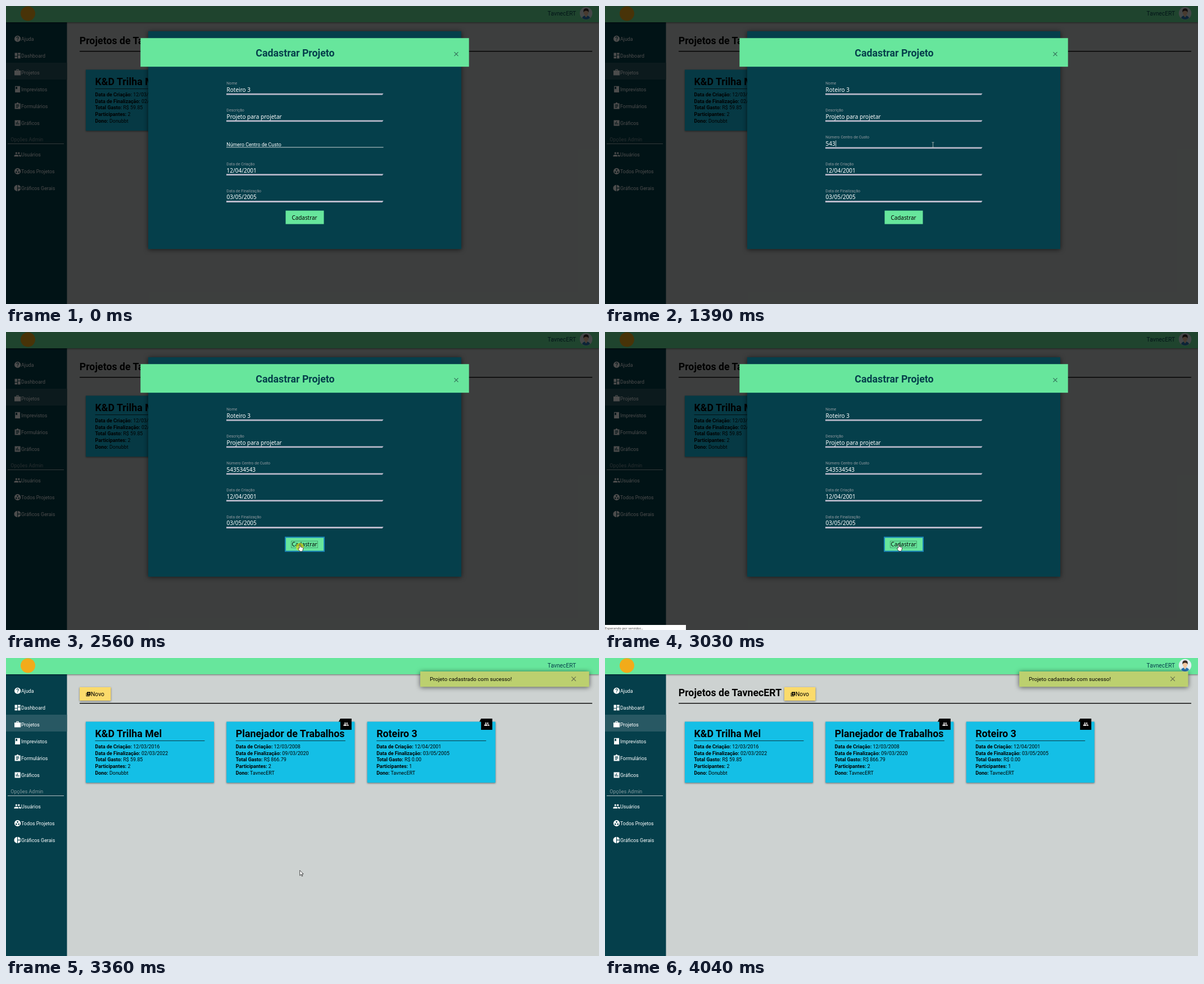
An HTML page that plays this animation: 1055 px wide and 531 px high, repeating every 4.44 s.

```html
<!DOCTYPE html>
<html lang="pt">
<head>
<meta charset="utf-8">
<style>
html, body { margin: 0; width: 100%; height: 100%; overflow: hidden; background: #cdd2d1; }
svg { display: block; width: 1055px; height: 531px; font-family: Roboto, sans-serif; }
.input { font-family: "Noto Sans", sans-serif; font-weight: 500; }
.bold { font-weight: 700; }
.raised { filter: drop-shadow(0 1px 1.5px rgba(0, 0, 0, .5)); }
.modal { filter: drop-shadow(0 1px 4px rgba(0, 0, 0, .6)); }
</style>
</head>
<body>
<svg id="stage" viewBox="0 0 1055 531"></svg>
<script>
const LOOP = 4440, FIRST = 54, STEP = 77.9;
const GREEN = '#67e69c', TEAL = '#053f4b', PITCH = 47.85;
const USER = 'TavnecERT', PROJECT = 'Roteiro 3';

const clamp = (v, lo = 0, hi = 1) => Math.min(hi, Math.max(lo, v));
const mix = (a, b, p) => a + (b - a) * p;
const rect = (x, y, w, h, fill, cls = '') =>
  `<rect x="${x}" y="${y}" width="${w}" height="${h}" fill="${fill}" class="${cls}"/>`;
const text = (x, y, size, str, fill = '#000', cls = '') =>
  `<text x="${x}" y="${y}" font-size="${size}" fill="${fill}" class="${cls}">${str}</text>`;
const circle = (x, y, r, fill, extra = '') =>
  `<circle cx="${x}" cy="${y}" r="${r}" fill="${fill}" ${extra}/>`;
const stroke = (d, color, width = 1) =>
  `<path d="${d}" fill="none" stroke="${color}" stroke-width="${width}"/>`;
const cross = (x, y, r, color) =>
  stroke(`M${x - r} ${y - r}l${2 * r} ${2 * r}m0 ${-2 * r}l${-2 * r} ${2 * r}`, color, 1.2);
const ring = (x, y, r) =>
  `M${x - r} ${y}a${r} ${r} 0 1 0 ${2 * r} 0a${r} ${r} 0 1 0 ${-2 * r} 0`;

// Icons on a 24-unit grid
const ICONS = {
  help: ring(12, 12, 10) + 'M11 17v2h2v-2zM8 9h2a2 2 0 1 1 3.4 1.4q-2.4 2-2.4 4.6h2q0-1.6 2-3.6a4 4 0 1 0-7-2.4z',
  dashboard: 'M3 3h8v10H3zM3 15h8v6H3zM13 11h8v10h-8zM13 3h8v6h-8z',
  work: 'M2 6h6V2h8v4h6v15H2zM10 4v2h4V4z',
  book: 'M4 2h16v20H4zM6 4v8l2.5-1.5L11 12V4z',
  form: 'M3 3h6a3 3 0 0 1 6 0h6v18H3zM7 7v2h10V7zM7 11v2h10v-2zM7 15v2h7v-2z',
  chart: 'M3 3h18v18H3zM7 10v7h2v-7zM11 7v10h2V7zM15 13v4h2v-4z',
  group: ring(8, 8, 3) + ring(16, 8, 3) +
    'M1 19v-2.5c0-4.6 14-4.6 14 0V19zM17 19v-2.5q0-2-2-3.45c3-.3 8 1 8 3.45V19z',
  teams: ring(12, 12, 10) + ring(8, 15, 2.5) + ring(12, 8, 2.5) + ring(16, 15, 2.5),
  pie: 'M11 2v20a10 10 0 0 1 0-20zM13 2v9h9a10 10 0 0 0-9-9zM13 13v9a10 10 0 0 0 9-9z',
  add: 'M2 6h2v14h14v2H2zM6 2h16v16H6zM13 5v4H9v2h4v4h2v-4h4V9h-4V5z'
};
const icon = (name, x, y, size, fill) =>
  `<path transform="translate(${x} ${y}) scale(${size / 24})" d="${ICONS[name]}" fill="${fill}" fill-rule="evenodd"/>`;

const MENU = [
  ['help', 'Ajuda', 59], ['dashboard', 'Dashboard', 89], ['work', 'Projetos', 119],
  ['book', 'Imprevistos', 149], ['form', 'Formulários', 179], ['chart', 'Gráficos', 209],
  ['group', 'Usuários', 265], ['teams', 'Todos Projetos', 295], ['pie', 'Gráficos Gerais', 325]
];
const CARDS = [
  [142, 'K&amp;D Trilha Mel', '12/03/2016', '02/03/2022', '59.85', 2, 'Donubbt'],
  [392.3, 'Planejador de Trabalhos', '12/03/2008', '09/03/2020', '866.79', 2, USER],
  [642.7, PROJECT, '12/04/2001', '03/05/2005', '0.00', 1, USER]
];

function sidebar(loaded) {
  let out = rect(0, 29, 108.5, 502, TEAL);
  if (loaded) {
    out += rect(0, 101, 108.5, 30, '#285863') + text(8.3, 240.6, 8.9, 'Opções Admin', '#84979c') +
      rect(3, 245, 100, 1, '#b4bfc2');
  }
  for (const [name, label, y] of MENU.slice(0, loaded ? 9 : 6))
    out += icon(name, 13.9, y - 7.3, 13.4, '#fff') + text(27, y + 3.4, 8.9, label, '#fff');
  return out;
}

function card([x, title, start, end, cost, people, owner], i) {
  const rows = [['Data de Criação', start], ['Data de Finalização', end],
    ['Total Gasto', 'R$ ' + cost], ['Participantes', people], ['Dono', owner]];
  let out = rect(x, 113.5, 228, 108.7, '#14bfe6', 'raised') +
    text(x + 16.5, 141, 17.8, title, '#000', 'bold') + rect(x + 16.5, 147, 195, 1, '#0b3c48');
  rows.forEach(([key, value], r) => {
    out += text(x + 16.5, 160.8 + r * 11.72, 8.9, `<tspan class="bold">${key}:</tspan> ${value}`);
  });
  if (i) {
    out += `<path d="M${x + 199.5} 113.5l3-5.5h20v20h-20v-14.5z"/>` +
      icon('group', x + 207.7, 112.8, 10, '#fff');
  }
  return out;
}

function avatar() {
  return circle(1032, 13, 11.2, '#e4eef3') +
    '<path d="M1025 21.5q1-4.5 7-4.5t7 4.5q-7 5-14 0z" fill="#2878b8"/>' +
    '<path d="M1030 16h4v2l-2 2.5-2-2.5z" fill="#f3cfae"/>' +
    '<ellipse cx="1032" cy="11.8" rx="4.2" ry="5" fill="#f3c7a0"/>' +
    '<path d="M1027.3 11.5q-1-7 4.7-7.2t4.7 7.2q-1.5-3-4.7-3t-4.7 3z" fill="#3a2a24"/>';
}

function page(loaded, complete, cards) {
  const x = complete ? 319 : 131;
  let out = rect(0, 0, 1055, 531, '#cdd2d1') + sidebar(loaded) + rect(131, loaded ? 80 : 56, 912, 1.4, '#000');
  if (loaded) {
    if (complete) out += text(130.7, 68, 17.8, 'Projetos de ' + USER, '#000', 'bold');
    out += rect(x, 52, 55.5, 24, '#fbdb6b', 'raised') + icon('add', x + 10.8, 59.6, 9.3, '#000') +
      text(x + 20, 67.7, 10.3, 'Novo') + CARDS.slice(0, cards).map(card).join('');
  }
  out += rect(0, 0, 1055, 29, GREEN, 'raised') + circle(39, 13.5, 13, '#f2ab1a');
  if (loaded) out += text(963.6, 17.2, 10.3, USER, TEAL);
  if (complete) out += avatar();
  return out;
}

function toast() {
  return rect(737, 24, 300.5, 27.3, '#bcd06f', 'modal') +
    text(754, 41, 9.8, 'Projeto cadastrado com sucesso!') + cross(1010, 37.2, 3.8, '#6b7650');
}

function field(i, label, value, lift) {
  const y = i * PITCH, tone = Math.round(mix(255, 146, lift));
  const line = lift < 1
    ? rect(392, 251.3, 279.5, 1, '#c9d0d3')
    : `<path d="M392 ${155.7 + y}h279.5l-2 2.8h-277.5z" fill="#bab9ca"/>`;
  return text(392.3, mix(154.6, 140.3, lift) + y, mix(8.9, 7.1, lift), label,
    `rgb(${tone},${tone + 8 * lift},${tone + 14 * lift})`) +
    text(392.6, 153 + y, 10, value, '#fff', 'input') + line;
}

function modal(k) {
  const pressed = k >= 32, lift = clamp((k - 12) / 2);
  const typed = '543534543'.slice(0, clamp(k - 14, 0, 9));
  let out = rect(0, 0, 1055, 531, 'rgba(0,0,0,.7)') +
    rect(253, 45, 557, pressed ? 391 : 388, TEAL, 'modal') +
    rect(239.3, 57.2, 584.4, 51, GREEN) + text(444.3, 90.3, 17.8, 'Cadastrar Projeto', TEAL, 'bold') +
    cross(801, 85.7, 3.5, '#35705a') +
    field(0, 'Nome', PROJECT, 1) + field(1, 'Descrição', 'Projeto para projetar', 1) +
    field(2, 'Número Centro de Custo', typed, lift) +
    field(3, 'Data de Criação', '12/04/2001', 1) + field(4, 'Data de Finalização', '03/05/2005', 1);
  if (k >= 13 && k < 26) out += rect(393 + typed.length * 5.8, 239.5, 0.8, 11, '#fff');
  if (pressed) {
    out += rect(496, 364.7, 71, 27, '#1a86b8') + rect(498, 366.7, 67, 23, GREEN) +
      '<rect x="507.5" y="372.5" width="47" height="12" fill="none" stroke="#000" stroke-width=".6" stroke-dasharray="1"/>';
  } else {
    out += rect(497.5, 364.6, 68, 24, GREEN);
  }
  out += text(508.5, pressed ? 382.4 : 380.5, 9.9, 'Cadastrar', '#000', 'input');
  if (k === 38)
    out += rect(0, 522, 144, 9, '#fff') + text(0, 530.2, 5.8, 'Esperando por servidor...', '#444', 'input');
  return out;
}

// Pointer stops: step, x, y
const PATH = [[0, 991, 522], [6, 604, 268], [9, 583.5, 247.5], [17, 583.5, 247.5], [20, 585, 259],
  [23, 589, 292.5], [27, 525, 374], [29, 523, 379], [44, 522.7, 378.3], [50, 990, 523]];

function pointer(k) {
  if (k < 0 || k > 50) return '';
  const i = Math.max(1, PATH.findIndex(stop => stop[0] >= k));
  const [k0, x0, y0] = PATH[i - 1], [k1, x1, y1] = PATH[i];
  const p = (k - k0) / (k1 - k0), e = p * p * (3 - 2 * p);
  const x = mix(x0, x1, e), y = mix(y0, y1, e);
  const overButton = k < 39 && y > 364 && x < 566;
  const overField = k < 39 && y < 350 && x < 671 && (y - 240) % PITCH < 13;
  let shape = '<path d="M0 0v9.2l2.2-2 1.5 3.4 1.4-.6-1.5-3.4h2.9z" fill="#fff" stroke="#000" stroke-width=".7"/>';
  if (overButton) {
    shape = '<path d="M-1 6V1a1 1 0 0 1 2 0v3l4 1q1 .3 .8 1.5l-.6 3q-.3 1.5-1.2 2.5h-4q-1-1.5-3.2-4.2-.3-1.4 1-1.2z" fill="#fff" stroke="#000" stroke-width=".7"/>';
  } else if (overField) {
    shape = stroke('M-2-4.5h4M0-4.5v9M-2 4.5h4', '#a9b3b3', 0.9);
  }
  const clicking = (k >= 10 && k <= 12) || (k >= 32 && k <= 34);
  return (clicking ? circle(x, y + (overButton ? 4 : 0), 7, '#ffe600', 'opacity=".55"') : '') +
    `<g transform="translate(${x} ${y})">${shape}</g>`;
}

function draw(k) {
  if (k < 39) return page(true, true, 2) + modal(k) + pointer(k);
  const loaded = k >= 41;
  return page(loaded, k >= 44, 3) + (loaded ? toast() : '') + pointer(k);
}

const stage = document.getElementById('stage');
let shown;
function tick() {
  const k = Math.floor((performance.now() % LOOP - FIRST) / STEP);
  if (k !== shown) stage.innerHTML = draw(shown = k);
  requestAnimationFrame(tick);
}
tick();
</script>
</body>
</html>
```
